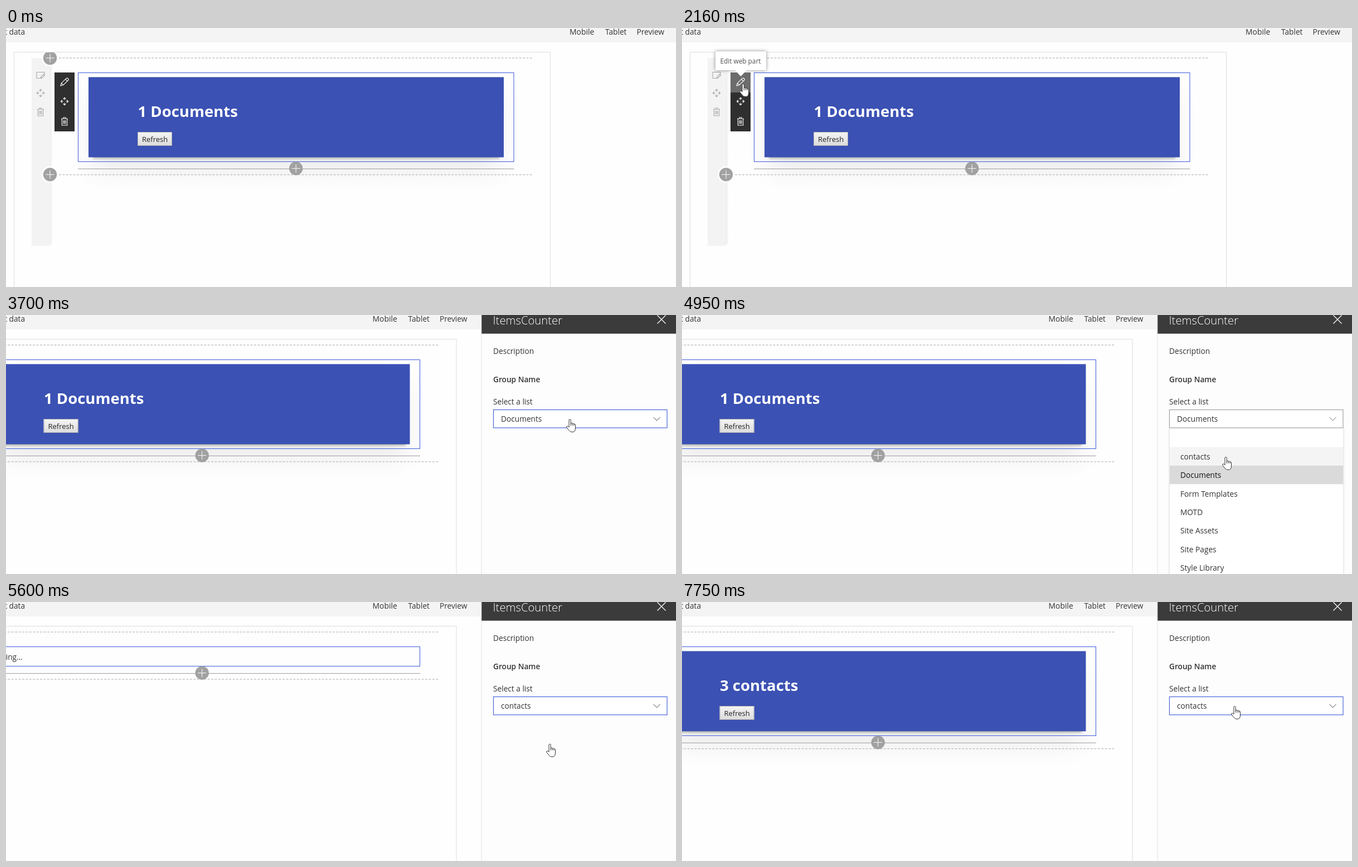
These frames come from a looping animation (1202x466 px, 8 s). An HTML page with a canvas:

```html
<!DOCTYPE html>
<html lang="en">
<head>
<meta charset="utf-8">
<title>Web part settings</title>
<style>
html, body { margin: 0; width: 100%; height: 100%; overflow: hidden; background: #fefefe; }
canvas { display: block; }
</style>
</head>
<body>
<canvas id="stage" width="1202" height="466"></canvas>
<script>
const ctx = document.getElementById('stage').getContext('2d');
const LOOP = 8000;
const INK = '#333', BLUE = '#4a66dc', CARD = '#3b51b3', PAGE = '#fefefe';
const SHIFT = -168.5, TOOLBAR_SHIFT = -353.5;

// Pointer stops: start time, shape, left, top
const stops = [
  [580, 'arrow', 665, 306], [890, 'beam', 295, 139], [1210, 'arrow', 197, 125],
  [1520, 'hand', 103, 100], [3080, 'arrow', 811, 157], [3400, 'hand', 1001, 182],
  [3700, 'hand', 1005, 187], [4330, 'hand', 981, 295], [4650, 'hand', 969, 269],
  [4950, 'hand', 969, 255], [6820, 'arrow', 985, 236], [7130, 'arrow', 986, 233],
  [7450, 'hand', 983, 201], [7750, 'hand', 985, 187]
];
const options = ['contacts', 'Documents', 'Form Templates', 'MOTD', 'Site Assets', 'Site Pages', 'Style Library'];

const shapes = {
  arrow: new Path2D('M.5 .5V17L4.3 13.4L7 19.8L9.5 18.7L6.8 12.6H12.5Z'),
  hand: new Path2D('M5 15V2.2Q5 .6 6.6 .6T8.3 2.2V8Q10.2 6.4 11.2 8.4Q13 7.2 14 9.2Q16.5 8.6 16.5 11V17Q16.5 23.6 11 23.6Q6.6 23.6 4.5 20L.8 15.2Q.2 13 2.3 13Q4 13.3 5 15Z'),
  knuckles: new Path2D('M8.3 8V12M11.2 8.4V12M14 9.2V12.2'),
  beam: new Path2D('M1 .8H4.2L5.5 2L6.8 .8H10M5.5 2V16M1 17.2H4.2L5.5 16L6.8 17.2H10'),
  pencil: new Path2D('M-7 7L-5.6 2.2L3.2 -6.4Q4.8 -7.6 6.4 -6T6.6 -3L-2.2 5.6ZM1.6 -4.8L4.9 -1.4M-5.6 2.2L-2.2 5.6'),
  note: new Path2D('M2 5.5H-7V-5.5H7V-2M0 5.5L1 2.5L5.6 -2L7.6 0L3 4.5Z'),
  move: new Path2D('M0 -6.5V-2.5M0 6.5V2.5M-6.5 0H-2.5M6.5 0H2.5M-2.4 -4.2L0 -6.6L2.4 -4.2M-2.4 4.2L0 6.6L2.4 4.2M-4.2 -2.4L-6.6 0L-4.2 2.4M4.2 -2.4L6.6 0L4.2 2.4'),
  trash: new Path2D('M-6 -4.8H6M-2 -5V-7H2V-5M-4.7 -4.5V7H4.7V-4.5M-2 -2V4.5M0 -2V4.5M2 -2V4.5')
};

function rect(x, y, w, h, color) {
  ctx.fillStyle = color;
  ctx.fillRect(x, y, w, h);
}

function frame(x, y, w, h, color, width = 1) {
  ctx.strokeStyle = color;
  ctx.lineWidth = width;
  ctx.strokeRect(x + .5, y + .5, w - 1, h - 1);
}

function line(x1, y1, x2, y2, color, width = 1, dash = []) {
  ctx.strokeStyle = color;
  ctx.lineWidth = width;
  ctx.setLineDash(dash);
  ctx.beginPath();
  ctx.moveTo(x1, y1);
  ctx.lineTo(x2, y2);
  ctx.stroke();
  ctx.setLineDash([]);
}

function text(str, x, y, size = 13.7, color = INK, weight = 400, align = 'left') {
  ctx.font = `${weight} ${size}px "Open Sans", "Noto Sans", sans-serif`;
  ctx.textAlign = align;
  ctx.fillStyle = color;
  ctx.fillText(str, x, y);
}

function icon(name, x, y, color) {
  ctx.save();
  ctx.translate(x, y);
  ctx.strokeStyle = color;
  ctx.lineWidth = 1.1;
  ctx.stroke(shapes[name]);
  ctx.restore();
}

function disc(x, y, r, color) {
  ctx.fillStyle = color;
  ctx.beginPath();
  ctx.arc(x, y, r, 0, 7);
  ctx.fill();
}

function plus(x, y, halo) {
  if (halo) disc(x, y, 15, PAGE);
  disc(x, y, 12.2, '#a1a1a1');
  line(x - 7.5, y, x + 7.5, y, '#fff');
  line(x, y - 7.5, x, y + 7.5, '#fff');
}

function shadowRect(x, y, w, h, color, dy, blur, alpha) {
  ctx.save();
  ctx.shadowColor = `rgba(0,0,0,${alpha})`;
  ctx.shadowOffsetY = dy;
  ctx.shadowBlur = blur;
  rect(x, y, w, h, color);
  ctx.restore();
}

function topBar(dx) {
  rect(0, 0, 1202, 26, '#f4f4f4');
  text('t data', 34, 11.5, 13.7, INK, 400, 'right');
  text('Mobile', 1011 + dx, 11.5, 13.9);
  text('Tablet', 1075 + dx, 11.5);
  text('Preview', 1131.5 + dx, 11.5);
}

function card(heading) {
  shadowRect(156, 96, 729, 136, CARD, 25, 40, .08);
  shadowRect(156, 96, 729, 136, CARD, 3, 4, .25);
  rect(148, 88.4, 745, 144.2, CARD);
  text(heading, 236.5, 160, 27.5, '#fff', 700);
  const fill = ctx.createLinearGradient(0, 187, 0, 212);
  fill.addColorStop(0, '#f5f5f5');
  fill.addColorStop(1, '#dcdcdc');
  rect(236, 187, 62, 25, fill);
  frame(236, 187, 62, 25, '#adadad');
  text('Refresh', 244, 205, 13, '#222');
}

function sideTools(hover) {
  const shade = ctx.createLinearGradient(79, 0, 84, 0);
  shade.addColorStop(0, 'rgba(0,0,0,.07)');
  shade.addColorStop(1, 'rgba(0,0,0,0)');
  rect(79, 57, 5, 332, shade);
  rect(46, 54, 33, 338, '#f3f3f3');
  icon('note', 62, 85, '#a6a6a6');
  icon('move', 62, 117, '#a6a6a6');
  icon('trash', 62, 151, '#a6a6a6');
  rect(87, 80, 36, 106, '#2f2f2f');
  if (hover) rect(87, 80, 36, 36, '#6c6c6c');
  icon('pencil', 105, 97, '#fff');
  icon('move', 105, 132, '#fff');
  icon('trash', 105, 168, '#fff');
}

function sheet(t, dx) {
  const loading = t >= 5600 && t < 5900;
  const end = loading ? 115 : 240;
  ctx.save();
  ctx.translate(dx, 0);
  frame(14, 43, 963, 500, '#dedede');
  if (!loading) card(t < 5600 ? '1 Documents' : '3 contacts');
  sideTools(t >= 1840 && t < 2780);
  line(95, 54, 945.5, 54, '#a8a8a8', 1.2, [4, 2.4]);
  line(95, end + 24, 945.5, end + 24, '#a8a8a8', 1.2, [4, 2.4]);
  frame(129, 80, 782.5, end - 79, BLUE, 1.1);
  if (loading) text('Loading...', 198.5, 104, 13.7, INK, 400, 'right');
  line(129, end + 13.5, 911.5, end + 13.5, '#9c9c9c');
  plus(520.2, end + 12.7);
  plus(79, end + 23.7, true);
  ctx.save();
  ctx.beginPath();
  ctx.rect(60, 44, 40, 40);
  ctx.clip();
  plus(79, 54, true);
  ctx.restore();
  ctx.restore();
}

function tooltip() {
  shadowRect(60, 42, 91, 34, '#fff', 0, 6, .45);
  ctx.fillStyle = '#fff';
  ctx.beginPath();
  ctx.moveTo(95, 76);
  ctx.lineTo(105.5, 87);
  ctx.lineTo(116, 76);
  ctx.fill();
  rect(60, 42, 91, 34, '#fff');
  text('Edit web part', 68.5, 64, 11.8, '#505050');
}

function menu(opening) {
  ctx.save();
  ctx.beginPath();
  ctx.rect(870, 204, 320, 262);
  ctx.clip();
  if (opening) {
    ctx.globalAlpha = .6;
    ctx.translate(0, -8);
  }
  shadowRect(875, 190, 311, 300, '#fff', 0, 4, .2);
  if (!opening) rect(875, 237.7, 311, 33.3, '#f4f4f4');
  rect(875, 271, 311, 33.3, '#dadada');
  options.forEach((name, i) => text(name, 894, 260 + i * 33.3, 13.7, i === 1 ? '#111' : INK));
  ctx.restore();
}

function panel(t) {
  const open = t >= 4020 && t < 5270;
  const opening = t < 4330;
  const greyed = open && !opening;
  rect(853, 0, 349, 466, '#fdfdfd');
  rect(852.5, 0, 1, 466, '#e2e2e2');
  rect(853.3, 0, 349, 33.6, '#3b3b3b');
  text('ItemsCounter', 873.5 + (t < 2780 ? 20 : 0), 17, 20.3, '#fff', 300);
  line(1168.5, .5, 1183.5, 15.5, '#fff', 1.2);
  line(1168.5, 15.5, 1183.5, .5, '#fff', 1.2);
  text('Description', 874, 70);
  text('Group Name', 874, 121, 13.7, INK, 600);
  text('Select a list', 874, 161);
  if (open) menu(opening);
  rect(874, 170, 312.5, 33.5, '#fff');
  frame(874, 170, 312.5, 33.5, greyed ? '#a0a0a0' : BLUE, 1.2);
  text(t < 5600 ? 'Documents' : 'contacts', 888, 192);
  const mark = greyed ? '#777' : '#444';
  line(1161.5, 184, 1167.7, 190, mark);
  line(1167.3, 190, 1173.5, 184, mark);
}

function pointer(t) {
  const stop = stops.filter(s => s[0] <= t).pop();
  if (!stop) return;
  const [, shape, x, y] = stop;
  ctx.save();
  ctx.translate(x, y);
  ctx.lineJoin = 'round';
  ctx.lineWidth = 1;
  ctx.strokeStyle = '#333';
  if (shape !== 'beam') {
    ctx.fillStyle = '#fff';
    ctx.fill(shapes[shape]);
  }
  ctx.stroke(shapes[shape]);
  if (shape === 'hand') ctx.stroke(shapes.knuckles);
  ctx.restore();
}

function draw(now) {
  const t = now % LOOP;
  const settled = t >= 2780;
  rect(0, 0, 1202, 466, PAGE);
  topBar(settled ? TOOLBAR_SHIFT : 0);
  sheet(t, settled ? SHIFT : t >= 2500 ? -10 : 0);
  if (t >= 2160 && t < 2500) tooltip();
  if (t >= 2500) panel(t);
  pointer(t);
}

const start = performance.now();
function tick() {
  draw(performance.now() - start);
  requestAnimationFrame(tick);
}
tick();
</script>
</body>
</html>
```
